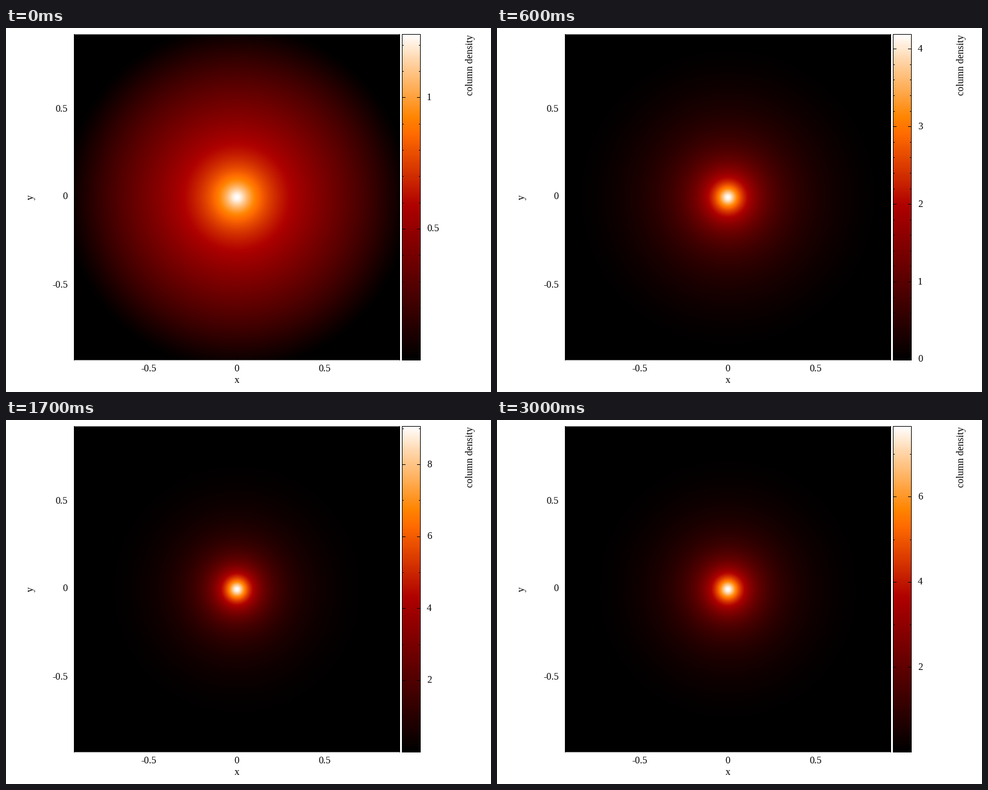
Recreate the animation shown at these times as a matplotlib script. Size 800 by 600 pixels, loop 3100 ms.

```python
import numpy as np
import matplotlib.pyplot as plt
from matplotlib.animation import FuncAnimation
from matplotlib.collections import LineCollection
from matplotlib.colors import LinearSegmentedColormap

W, H, DPI = 800, 600, 100
STEPS, INTERVAL = 31, 100
LEFT, RIGHT, TOP, BOTTOM = 112, 650, 10, 548
CX, CY, UNIT = 381, 279, 290          # plot centre and pixels per unit
BAR_L, BAR_R, BAR_T, BAR_B = 653, 684, 10, 548
PIXEL = 72 / DPI                      # one pixel in points
FONT_PT = 16.3 * PIXEL
SOFTENING = 0.0405                    # core radius of the gas sphere
ZERO_SHOWN = range(2, 15)             # steps whose colour scale reaches zero

# Highest column density (step, value): collapse, bounce, damped oscillation
PEAK_KEYS = np.array([(0, 1.241), (4, 2.183), (6, 4.19), (9, 11.25),
                      (10.5, 12.4), (14, 10.6), (17, 9.065), (18, 7.7),
                      (21.5, 6.37), (24, 6.817), (28, 7.7), (30, 7.66)])

# Colour ramp: position, red, green, blue
HEAT = [(0, 0, 0, 0), (.475, .686, .004, 0), (.694, 1, .42, 0),
        (.745, 1, .518, 0), (.92, 1, .835, .66), (1, 1, 1, 1)]
heat = LinearSegmentedColormap.from_list(
    "heat", [(stop, rgb) for stop, *rgb in HEAT], N=512)

px = (np.arange(LEFT, RIGHT) + 0.5 - CX) / UNIT
py = (np.arange(TOP, BOTTOM) + 0.5 - CY) / UNIT
RADIUS = np.hypot(px[None, :], py[:, None])


def hermite(x, xs, ys):
    """Smooth curve through the points (xs, ys), flat at both ends."""
    slope = np.gradient(ys, xs)
    slope[0] = slope[-1] = 0
    i = np.clip(np.searchsorted(xs, x, side="right") - 1, 0, len(xs) - 2)
    h = xs[i + 1] - xs[i]
    t = (x - xs[i]) / h
    return ((1 + 2 * t) * (1 - t) ** 2 * ys[i] + t * (1 - t) ** 2 * h * slope[i]
            + t * t * (3 - 2 * t) * ys[i + 1] + t * t * (t - 1) * h * slope[i + 1])


def peak(step):
    return hermite(step, *PEAK_KEYS.T)


def density(step):
    """Projected 1/r sphere, steeper and smaller the more it is compressed."""
    squeeze = max(0, np.log(peak(step) / peak(0)))
    edge = 1 - 0.04 * squeeze ** 2
    steepness = 1 + 1.08 * squeeze ** 0.65
    column = np.arccosh(np.maximum(1, edge / np.hypot(RADIUS, SOFTENING)))
    column /= np.arccosh(edge / SOFTENING)
    taper = np.clip(1 - (RADIUS / edge) ** 6, 0, 1)
    return column ** steepness * taper


def tick_spacing(span):
    """Major interval and number of subdivisions for an axis of this span."""
    raw = 0.2 * span
    power = 10 ** np.floor(np.log10(raw))
    for base, parts in ((1, 5), (2, 2), (5, 5), (10, 5)):
        if raw <= base * power:
            return base * power, parts


def centre(v):
    """Middle of the pixel that holds v."""
    return np.floor(v) + 0.5


def label(x, y, text="", **kw):
    return ax.text(x, y, text, family="Liberation Serif", size=FONT_PT,
                   color="black", va="baseline", rotation_mode="anchor", **kw)


def lines(segments, color="black"):
    return ax.add_collection(LineCollection(
        segments, colors=color, linewidths=PIXEL, capstyle="butt", snap=False))


def box(x0, x1, y0, y1, color="black"):
    """Rectangle whose one-pixel outline lies just inside the given edges."""
    l, r, t, b = x0 + 0.5, x1 - 0.5, y0 + 0.5, y1 - 0.5
    lines([[(x0, t), (x1, t)], [(x0, b), (x1, b)]], color)
    lines([[(l, y0), (l, y1)], [(r, y0), (r, y1)]])


fig = plt.figure(figsize=(W / DPI, H / DPI), dpi=DPI, facecolor="white")
ax = fig.add_axes([0, 0, 1, 1])
ax.axis("off")

ramp = np.linspace(1, 0, BAR_B - BAR_T)[:, None]
style = dict(cmap=heat, vmin=0, vmax=1, interpolation="nearest")
image = ax.imshow(density(0), extent=(LEFT, RIGHT, BOTTOM, TOP), **style)
ax.imshow(ramp, extent=(BAR_L, BAR_R, BAR_B, BAR_T), **style)
ax.set_aspect("auto")
ax.set_xlim(0, W)
ax.set_ylim(H, 0)

plot_ticks = []
for k in range(-9, 10):
    size = 6 if k % 5 == 0 else 3
    x, y = centre(CX + k * UNIT / 10), centre(CY - k * UNIT / 10)
    plot_ticks += [[(x, TOP), (x, TOP + size)], [(x, BOTTOM), (x, BOTTOM - size)],
                   [(LEFT, y), (LEFT + size, y)], [(RIGHT, y), (RIGHT - size, y)]]
lines(plot_ticks)
box(LEFT, RIGHT, TOP, BOTTOM, "0.5")
box(BAR_L, BAR_R, BAR_T, BAR_B)

for value in (-0.5, 0, 0.5):
    label(CX - 0.5 + value * UNIT, 566, f"{value:g}", ha="center")
    label(102, 282.5 - value * UNIT, f"{value:g}", ha="right")
label(CX - 0.5, 585, "x", ha="center")
label(45, 279, "y", rotation=90, ha="center")
label(770, 61, "column density", rotation=90, ha="center")

bar_ticks = lines([])
bar_labels = [label(694, 0, ha="left") for _ in range(8)]


def draw(step):
    image.set_data(density(step))
    top = peak(step)
    low = top * (-0.002 if step in ZERO_SHOWN else 0.001)
    major, parts = tick_spacing(top - low)
    minor = major / parts
    segments, marks = [], []
    for k in range(int(np.ceil(low / minor)), int(top / minor) + 1):
        y = 10.5 + (top - k * minor) / (top - low) * 537
        size = 6 if k % parts == 0 else 3
        row = centre(y)
        segments += [[(BAR_L, row), (BAR_L + size, row)],
                     [(BAR_R, row), (BAR_R - size, row)]]
        if k % parts == 0:
            marks.append((y, f"{k * minor:g}"))
    bar_ticks.set_segments(segments)
    for i, item in enumerate(bar_labels):
        y, text = marks[i] if i < len(marks) else (0, "")
        item.set_position((694, y + 4))
        item.set_text(text)
    return [image, bar_ticks, *bar_labels]


anim = FuncAnimation(fig, draw, frames=STEPS, interval=INTERVAL,
                     repeat=True, repeat_delay=0, blit=False)
plt.show()
```
